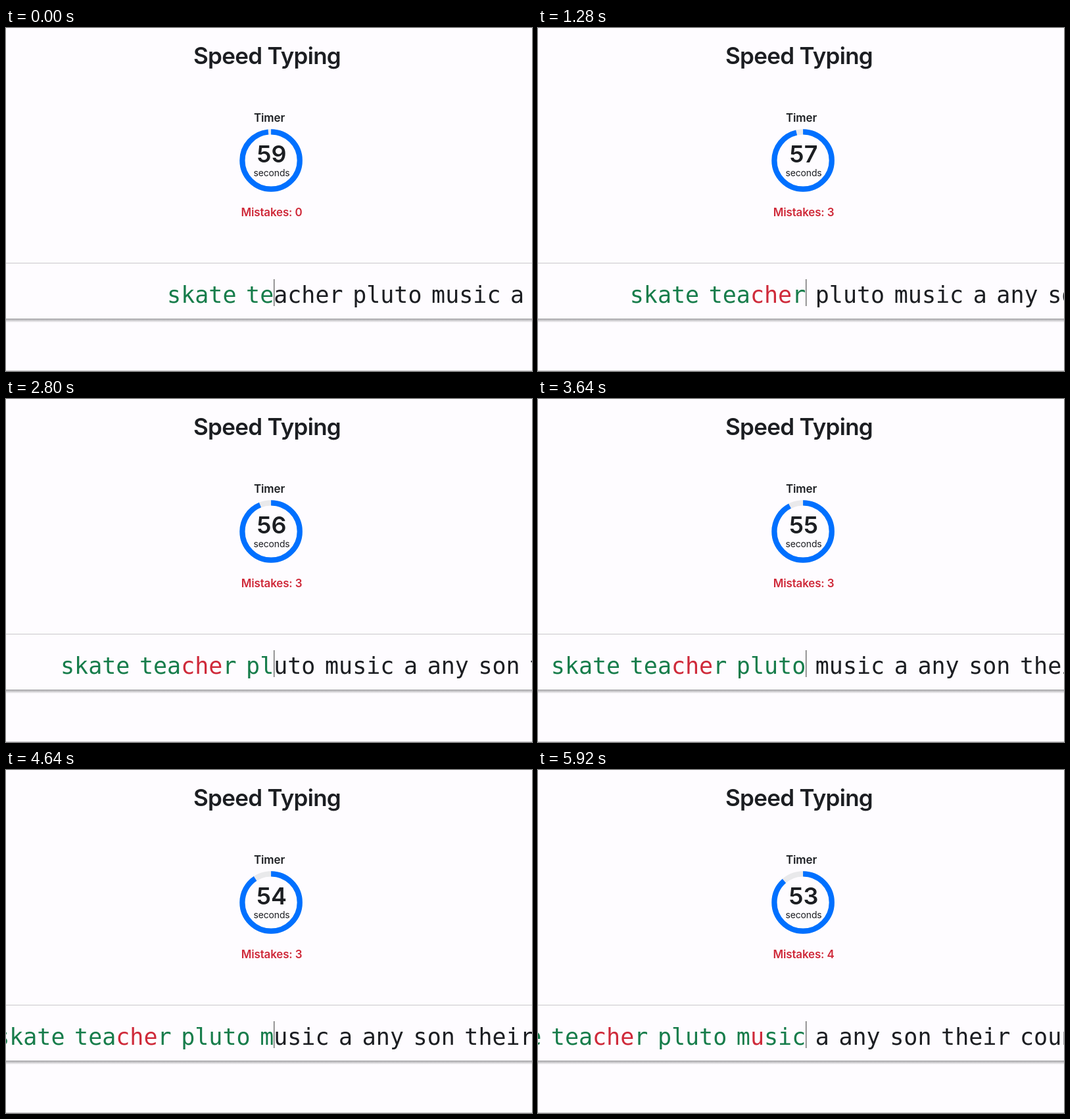
An HTML page with a canvas that plays this animation: 800x523 px, repeating every 5960 ms.

```html
<!DOCTYPE html>
<html lang="en">
<head>
<meta charset="utf-8">
<title>Speed Typing</title>
<style>
  html, body { margin: 0; width: 100%; height: 100%; overflow: hidden; background: #fefcff; }
  canvas { display: block; }
</style>
</head>
<body>
<canvas id="stage" width="800" height="523"></canvas>
<script>
const ctx = document.getElementById('stage').getContext('2d');
const LOOP = 5960, STEP = 40;
const BG = '#fefcff', INK = '#1c1e22', GREEN = '#177d4b', RED = '#cf2a3a', BLUE = '#0070ff';
const SANS = 'Inter, Roboto, sans-serif';
const MONO = '"DejaVu Sans Mono", monospace';

const words = 'skate teacher pluto music a any son their country';
const wrong = [9, 10, 11, 21];
const typedAtStart = 8;
const keyTimes = [120, 240, 360, 520, 1240, 1480, 2080, 2640, 2920,
                  3240, 3600, 3840, 4560, 5480, 5600, 5760, 5880];
const CARET = 407.2, LETTER = 21.07, SPACE = 14.6;

// Left edge of every character, measured from the first one
const offsets = [0];
for (const ch of words) offsets.push(offsets.at(-1) + (ch === ' ' ? SPACE : LETTER));

function label(text, x, y, size, weight, color = INK, spacing = -0.01) {
  ctx.font = `${weight} ${size}px ${SANS}`;
  ctx.letterSpacing = `${spacing * size}px`;
  ctx.textAlign = 'center';
  ctx.fillStyle = color;
  ctx.fillText(text, x, y);
  ctx.letterSpacing = '0px';
}

function arc(from, to, color) {
  ctx.beginPath();
  ctx.arc(403.1, 202, 43.7, from - Math.PI / 2, to - Math.PI / 2);
  ctx.lineWidth = 8.2;
  ctx.strokeStyle = color;
  ctx.stroke();
}

function drawTimer(t) {
  const left = 59.08 - t / 1000;
  arc(0, Math.PI * 2, '#e9e9eb');
  arc(0, Math.PI * 2 * left / 60, BLUE);
  label('Timer', 400.5, 142.5, 17, 600);
  label(Math.floor(left), 404, 204.5, 36, 600, INK, 0);
  label('seconds', 404, 226, 14, 400);
}

function drawCard() {
  ctx.fillStyle = '#c9c8ca';
  ctx.fillRect(0, 358, 800, 1);
  ctx.fillRect(0, 522, 800, 1);
  const shade = ctx.createLinearGradient(0, 443, 0, 449);
  shade.addColorStop(0, '#a3a2a5');
  shade.addColorStop(0.4, '#c4c3c6');
  shade.addColorStop(1, BG);
  ctx.fillStyle = shade;
  ctx.fillRect(0, 443, 800, 6);
}

function drawWords(typed) {
  const start = CARET - offsets[typed];
  ctx.font = `35px ${MONO}`;
  ctx.textAlign = 'left';
  [...words].forEach((ch, i) => {
    ctx.fillStyle = i >= typed ? INK : wrong.includes(i) ? RED : GREEN;
    ctx.fillText(ch, start + offsets[i], 418.5);
  });
  ctx.fillStyle = '#555';
  ctx.fillRect(407.2, 383, 1.2, 41);
}

function draw(now) {
  const t = Math.floor((now % LOOP) / STEP) * STEP;
  const typed = typedAtStart + keyTimes.filter(k => k <= t).length;
  const mistakes = wrong.filter(i => i < typed).length;
  ctx.fillStyle = BG;
  ctx.fillRect(0, 0, 800, 523);
  label('Speed Typing', 397, 54.5, 35, 600, INK, -0.02);
  drawTimer(t);
  label('Mistakes: ' + mistakes, 404, 287, 17, 600, RED);
  drawCard();
  drawWords(typed);
}

const begin = performance.now();
function tick() {
  draw(performance.now() - begin);
  requestAnimationFrame(tick);
}
tick();
</script>
</body>
</html>
```
